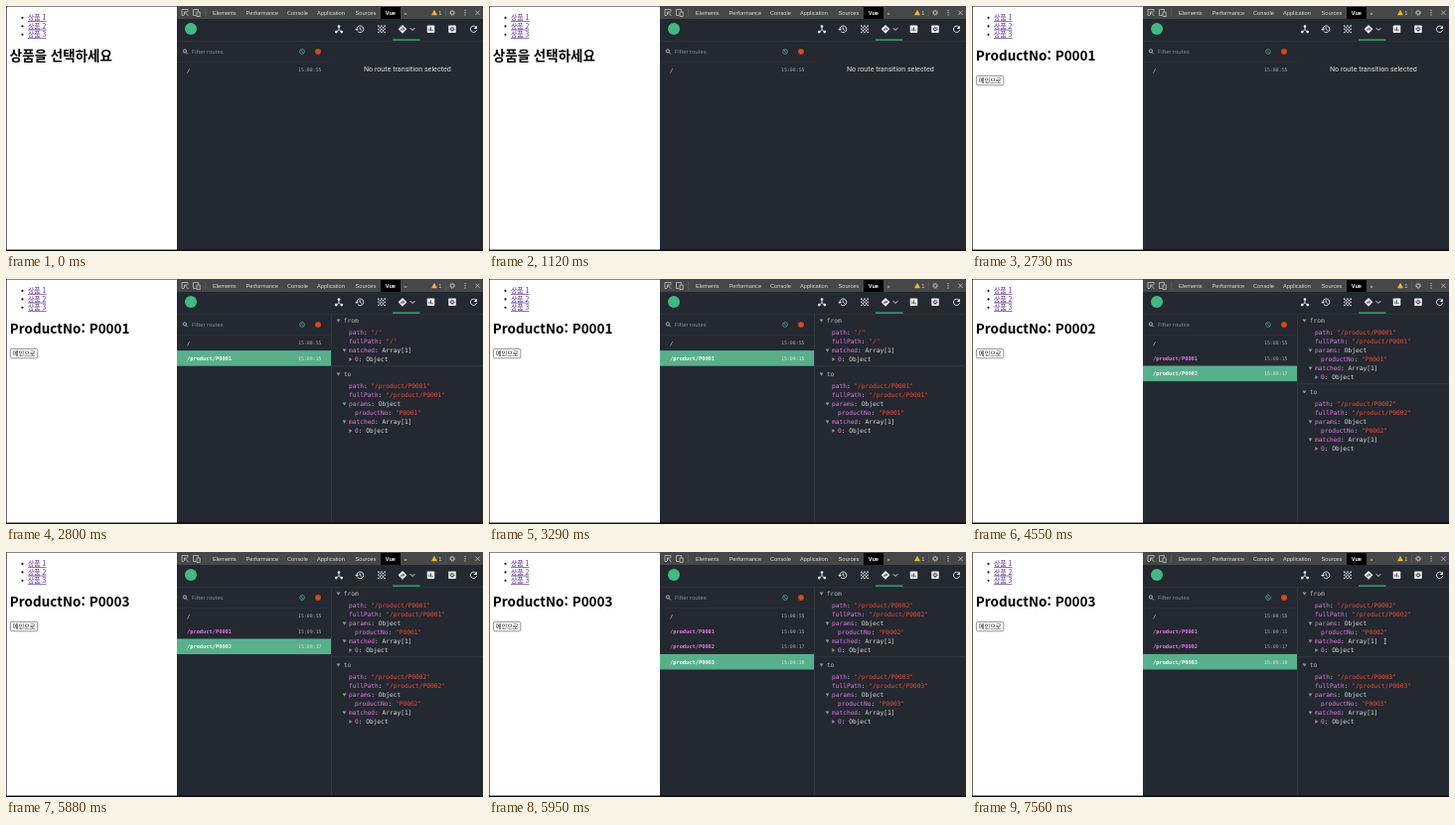
An HTML page for the animation above (8000 ms loop, 480 by 247 pixels).

```html
<!DOCTYPE html>
<html lang="ko">
<head>
<meta charset="utf-8">
<title>Route inspector</title>
<style>
  html, body { margin: 0; width: 100%; height: 100%; overflow: hidden; background: #fff; }
  svg { display: block; width: 100vw; height: 100vh; }
  text { white-space: pre; }
  .page { font-family: "Noto Sans CJK KR", "Noto Sans CJK", sans-serif; }
  .tab { font: 5.7px "Liberation Sans", sans-serif; fill: #dcdcdc; }
  .ui { font-family: Roboto, sans-serif; }
  .row { font: 5.35px "DejaVu Sans Mono", monospace; fill: #e2e2e2; }
  .time { font: 4.9px "DejaVu Sans Mono", monospace; fill: #a3a6ab; }
  .tree { font: 6.2px "DejaVu Sans Mono", monospace; fill: #dcdde0; }
  .key { fill: #e07ae8; }
  .string { fill: #ee4a35; }
  .line { fill: none; stroke: #e8e8e8; stroke-width: 2.4; }
  .solid { fill: #f0f0f0; }
  .thin { fill: none; stroke: #c4c4c4; stroke-width: .8; }
</style>
</head>
<body>
<svg id="stage" viewBox="0 0 480 247" preserveAspectRatio="none"></svg>
<script>
const LOOP = 8000;
const DEVTOOLS_DELAY = 70;
const CURSOR_TIME = 7350;
const visits = [
  { at: 0, time: '15:08:55' },
  { at: 2730, time: '15:09:15', id: 'P0001' },
  { at: 4340, time: '15:09:17', id: 'P0002' },
  { at: 5880, time: '15:09:19', id: 'P0003' }
];
const pathOf = visit => visit.id ? `/product/${visit.id}` : '/';

const rect = (x, y, w, h, fill, extra = '') =>
  `<rect x="${x}" y="${y}" width="${w}" height="${h}" fill="${fill}" ${extra}/>`;
const text = (x, y, content, cls, extra = '') =>
  `<text x="${x}" y="${y}" class="${cls}" ${extra}>${content}</text>`;
const path = (d, cls) => `<path d="${d}" class="${cls}"/>`;
const circle = (x, y, r, extra) => `<circle cx="${x}" cy="${y}" r="${r}" ${extra}/>`;
const arrow = (x, y, open) =>
  `<path d="${open ? 'M-2-1.4H2L0 1.8z' : 'M-1.2-2V2L1.8 0z'}" transform="translate(${x} ${y})" fill="#8d9198"/>`;
// Icons are drawn on a 24-unit grid centred on (x, y).
const icon = (x, y, size, body) =>
  `<g transform="translate(${x} ${y}) scale(${size / 24}) translate(-12 -12)">${body}</g>`;

const gear = (color, width) =>
  circle(12, 12, 5, `fill="none" stroke="${color}" stroke-width="${width}"`) +
  circle(12, 12, 7.5, `fill="none" stroke="${color}" stroke-width="3" stroke-dasharray="3 2.89"`);

function checker() {
  let dots = '';
  for (let r = 0; r < 5; r++)
    for (let c = 0; c < 5; c++)
      if ((r + c) % 2 === 0) dots += circle(4 + c * 4, 4 + r * 4, 2, 'class="solid"');
  return dots;
}

function tabBar() {
  const tabs = [[208, 'Elements'], [241.5, 'Performance'], [283, 'Console'],
    [313, 'Application'], [351.5, 'Sources'], [400.5, '»']];
  return rect(172, 0, 308, 13, '#464748') +
    rect(377, 1, 20, 12, '#000') +
    tabs.map(([x, label]) => text(x, 9, label, 'tab')).join('') +
    text(381.8, 9, 'Vue', 'tab', 'style="font-weight:bold;fill:#fff"') +
    path('M179 9.5h-2v-6h6v2M179.5 6l4 4M179.5 9V6h3', 'thin') +
    path('M188.5 3.5h5v2M188.5 3.5v6h3M192 6h3.2v4.5H192z', 'thin') +
    rect(200.5, 2.5, .6, 8, '#666') +
    '<path d="M431 3.8L434 9.2H428z" fill="#f0b52e"/>' +
    text(435.2, 9, '1', 'tab') + rect(442, 2.5, .6, 8, '#666') +
    icon(449, 6.8, 8, gear('#c4c4c4', 2.4)) +
    [-2.2, 0, 2.2].map(d => circle(462, 6.8 + d, .7, 'fill="#c4c4c4"')).join('') +
    path('M472.3 4.6l4.4 4.4M476.7 4.6l-4.4 4.4', 'thin');
}

function toolbar() {
  const icons = [
    [335, path('M12 6v7M12 13l-6 6M12 13l6 6', 'line') +
      [[12, 5], [5, 19], [19, 19]].map(([x, y]) => circle(x, y, 3.3, 'class="solid"')).join('')],
    [356, path('M4.5 12a8.5 8.5 0 1 1 2.5 6M12.5 7v5.5l4 2.5', 'line') + path('M0 11h9l-4.5 5z', 'solid')],
    [378, checker()],
    [399, path('M12 1L23 12 12 23 1 12z', 'solid') +
      '<path d="M9 16v-4.5h6M13 8l3.5 3.5L13 15" fill="none" stroke="#242830" stroke-width="2"/>'],
    [409, path('M6 9l6 6 6-6', 'line')],
    [427.5, rect(2.5, 2.5, 19, 19, '#f0f0f0', 'rx="2"') +
      rect(7, 10, 2, 7, '#242830') + rect(11, 7, 2, 10, '#242830') + rect(15, 13, 2, 4, '#242830')],
    [449, rect(2.5, 2.5, 19, 19, '#f0f0f0', 'rx="2"') +
      `<g transform="translate(3.6 3.6) scale(.7)">${gear('#242830', 3)}</g>`],
    [470.5, path('M18 6.5a8 8 0 1 0 2 7.5', 'line') + path('M20.5 3v8h-8z', 'solid')]
  ];
  return circle(186, 23, 6, 'fill="#42b983"') +
    icons.map(([x, body]) => icon(x, 23.3, 9.5, body)).join('') +
    rect(172, 35, 308, .6, '#343942') +
    rect(389, 33.5, 27.5, 1.2, '#42b983');
}

function filterBar() {
  return icon(180.5, 46, 7, circle(10, 10, 5.5, 'class="line"') + path('M14 14l6 6', 'line')) +
    text(187, 48, 'Filter routes', 'ui', 'font-size="6" fill="#858991"') +
    '<g fill="none" stroke="#3f9a83" stroke-width=".9"><circle cx="298" cy="46" r="2.4"/><path d="M296.3 44.3l3.4 3.4"/></g>' +
    circle(314, 46, 3, 'fill="#c9401c"') +
    circle(314, 46, 1.7, 'fill="#e04d24"') +
    rect(172, 56, 155, .5, '#30353d');
}

function webPage(visit) {
  const links = [1, 2, 3].map(n => {
    const y = 5.8 + n * 8.45;
    return circle(16.5, y - 2.3, 1.1, 'fill="#111"') +
      text(22, y, `상품 ${n}`, 'page', 'font-size="6.9" fill="#5a2d94" text-decoration="underline"');
  }).join('');
  const title = visit.id ? `ProductNo: ${visit.id}` : '상품을 선택하세요';
  const button = rect(4.4, 70.4, 27.4, 9.4, '#fff', 'rx="1.4" stroke="#777" stroke-width=".8"') +
    text(6.8, 77.3, '메인으로', 'page', 'font-size="6.2" fill="#111"');
  return rect(0, 0, 172, 247, '#fff') + links +
    text(3.8, 55, title, 'page', 'font-size="13.5" font-weight="700" fill="#000"') +
    (visit.id ? button : '');
}

function routeList(current) {
  return visits.slice(0, current + 1).map((visit, i) => {
    const y = 64.5 + i * 15.4;
    const selected = current > 0 && i === current;
    const color = selected ? '#fff' : visit.id ? '#e07ae8' : '#e2e2e2';
    return (selected ? rect(172, y - 7.8, 155, 15.6, '#58b08b') : '') +
      text(182, y + 2, pathOf(visit), 'row', `style="fill:${color};font-weight:${visit.id ? 700 : 400}"`) +
      text(294, y + 1.8, visit.time, 'time', selected ? 'style="fill:#d5ebe1"' : '');
  }).join('');
}

function routeTree(label, visit, y) {
  const quote = value => `<tspan class="string">"${value}"</tspan>`;
  const route = pathOf(visit);
  const lines = [[345, 'path', quote(route)], [345, 'fullPath', quote(route)]];
  if (visit.id) lines.push([345, 'params', 'Object', true], [351, 'productNo', quote(visit.id)]);
  lines.push([345, 'matched', 'Array[1]', true], [351, '0', 'Object', false]);
  const body = lines.map(([x, key, value, open], i) => {
    const lineY = y + 12 + i * 9;
    return (open === undefined ? '' : arrow(x - 4.5, lineY, open)) +
      text(x, lineY + 2, `<tspan class="key">${key}</tspan>: ${value}`, 'tree');
  }).join('');
  return {
    svg: arrow(334.5, y, true) + text(339.8, y + 2, label, 'tree', 'style="fill:#b9bcc2"') + body,
    next: y + 18 + lines.length * 9
  };
}

function details(current) {
  if (!current)
    return text(360, 66.3, 'No route transition selected', 'ui', 'font-size="7.15" fill="#dcdde0"');
  const from = routeTree('from', visits[current - 1], 42);
  const to = routeTree('to', visits[current], from.next);
  return rect(327, 36, .6, 210, '#3a3f48') + from.svg +
    rect(327, from.next - 8.5, 153, .6, '#3a3f48') + to.svg;
}

const textCursor = () => path('M414.8 87.5h2M414.8 92.5h2M415.8 87.5v5', 'thin');
const chrome = rect(172, 0, 308, 247, '#242830') + tabBar() + toolbar() + filterBar();
const frame = rect(0, 0, 172, .7, '#555') + rect(0, 0, .8, 247, '#444') + rect(0, 245.6, 480, 1.4, '#08090b');

const stage = document.getElementById('stage');
const visitAt = t => visits.findLastIndex(visit => t >= visit.at);
let shown = '';

function draw(now) {
  const t = now % LOOP;
  const page = visitAt(t);
  const tools = Math.max(0, visitAt(t - DEVTOOLS_DELAY));
  const cursor = t >= CURSOR_TIME;
  const state = [page, tools, cursor].join();
  if (state !== shown) {
    shown = state;
    stage.innerHTML = webPage(visits[page]) + chrome + routeList(tools) + details(tools) +
      (cursor ? textCursor() : '') + frame;
  }
  requestAnimationFrame(draw);
}
draw(performance.now());
</script>
</body>
</html>
```
